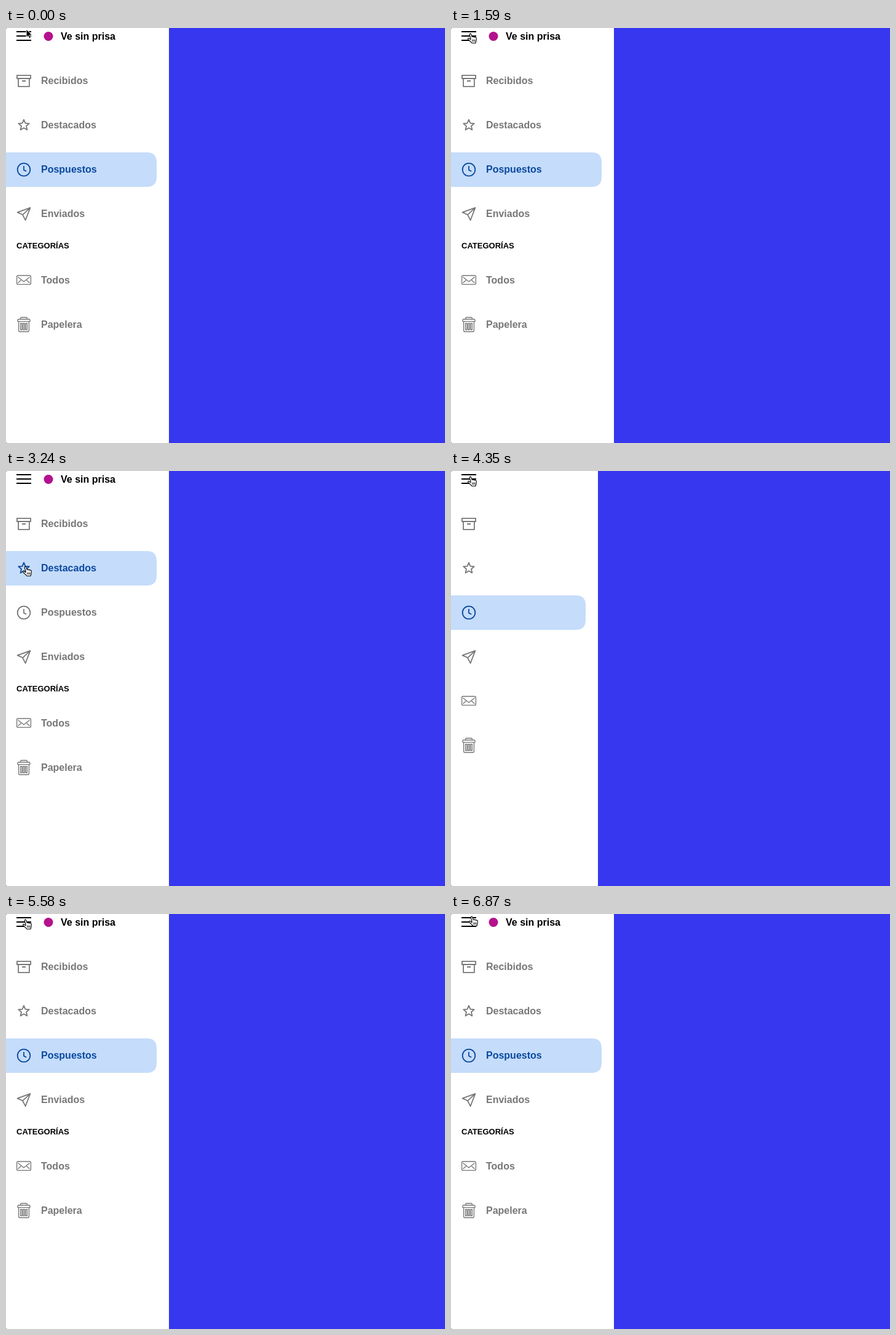
An HTML page for the animation above (6900 ms loop, 714 px wide and 674 px high).

```html
<!DOCTYPE html>
<html lang="es">
<head>
<meta charset="utf-8">
<title>Menú lateral</title>
<style>
  html, body { margin: 0; width: 100%; height: 100%; overflow: hidden; background: #444; }
  svg { display: block; width: 714px; height: 674px; border-radius: 2px; }
  text { font: bold 16px "Liberation Sans", Arial, sans-serif; }
  .item { color: #777; }
  .item.on { color: #0b4a9f; }
  .item text { fill: currentColor; }
  .icon { fill: none; stroke: currentColor; stroke-width: 1.8; stroke-linejoin: round; }
  .thin { stroke-width: 1.35; }
  .small { font-size: 13px; }
</style>
</head>
<body>
<svg viewBox="0 0 714 674">
  <rect width="714" height="674" fill="#3737ef"/>
  <rect id="panel" height="674" fill="#fff"/>
  <path d="M17 6H41M17 13H41M17 20H41" stroke="#000" stroke-width="2.1"/>
  <path id="mark" fill="#c5dcfb"/>
  <g id="items"></g>
  <g id="labels">
    <circle cx="69" cy="13.5" r="7.5" fill="#b3128c"/>
    <text x="89" y="19">Ve sin prisa</text>
    <text class="small" x="17" y="358">CATEGORÍAS</text>
  </g>
  <g id="arrow">
    <path d="M0 0V13.2L3 10.5 5.1 15.2 7.4 14.2 5.4 9.6H9.6Z" fill="#000" stroke="#fff" stroke-width="1"/>
  </g>
  <g id="hand">
    <g transform="translate(-5 -1)" stroke="#000" stroke-linejoin="round" stroke-linecap="round">
      <path fill="#fff" stroke-width="1.1" d="M6.2 9.5 4.2 3C3.6 1.2 6 .4 6.7 2.1L8.3 6.6C8.6 5.4 10.6 5.6 10.8 6.9 11.3 5.9 13 6.2 13.1 7.4 14 6.8 15.3 7.3 15.3 8.8 15.5 12 15 13.5 14 16.5H8C6.5 14.5 4.2 13 2.2 10.8.6 9 2.2 7.9 3.6 8.8L6 11"/>
      <path stroke-width=".9" d="M8.8 11V14M10.8 11V14M12.8 11V14"/>
    </g>
  </g>
</svg>
<script>
const LOOP = 6900, STEP = 30, SLIDE = 350;
const OPEN = 265, CLOSED = 81;
const $ = id => document.getElementById(id);

const star = Array.from({ length: 10 }, (_, i) => {
  const r = i % 2 ? 4.2 : 9.2, a = i * Math.PI / 5;
  return (r * Math.sin(a)).toFixed(2) + ' ' + (-r * Math.cos(a)).toFixed(2);
}).join('L');

// Icon paths are drawn around the centre of each row.
const items = [
  ['Recibidos', 86, 'M-11.1-9.1H11.1V-4H-11.1ZM-8.9-4V9.1H8.9V-4M-3 0H3'],
  ['Destacados', 158, 'M' + star + 'Z'],
  ['Pospuestos', 230, 'M-10.3 0A10.3 10.3 0 1 1 10.3 0A10.3 10.3 0 1 1-10.3 0M0-6V.6L4.2 2.8'],
  ['Enviados', 302, 'M10.4-10.1-10.4-2.6-1.9 1.3 2.6 10.2ZL-1.9 1.3'],
  ['Todos', 409, 'M-9.4-7H9.4Q11.4-7 11.4-5V5.4Q11.4 7.4 9.4 7.4H-9.4Q-11.4 7.4-11.4 5.4V-5Q-11.4-7-9.4-7ZM-9.5-4.5 0 3 9.5-4.5M-9.5 5-4.5.6M9.5 5 4.5.6', 'thin'],
  ['Papelera', 482, 'M-5.4-9V-10.5Q-5.4-12-4-12H4Q5.4-12 5.4-10.5V-9M-8.6-9H8.6Q10-9 10-7.6V-5.4H-10V-7.6Q-10-9-8.6-9ZM-8.4-5.4V9Q-8.4 11.2-6.2 11.2H6.2Q8.4 11.2 8.4 9V-5.4M-5.4-2.4H-3V8H-5.4ZM-1.2-2.4H1.2V8H-1.2ZM3-2.4H5.4V8H3Z', 'thin']
];
$('items').innerHTML = items.map(([name, y, d, extra = '']) =>
  `<g class="item"><path class="icon ${extra}" transform="translate(29 ${y})" d="${d}"/>` +
  `<text x="57" y="${y < 400 ? y + 5 : y === 409 ? 415 : 487}">${name}</text></g>`).join('');
const rows = [...$('items').children];

// [start, opens]
const slides = [[490, 0], [1045, 1], [1740, 0], [2344, 1], [4305, 0], [5004, 1], [5588, 0], [6220, 1]];
// [time, selected row]
const picks = [[0, 2], [3060, 1], [3540, 0], [3960, 2]];
// [time, x, y] of the pointer tip
const moves = [[0, 33, 2], [90, 33, 2], [210, 31, 9], [2850, 31, 9], [3000, 31, 155],
  [3360, 31, 155], [3480, 31, 84], [3690, 31, 84], [3930, 31, 228], [3960, 31, 228],
  [4260, 31, 9], [6570, 31, 9], [6870, 33, 4], [LOOP, 33, 4]];

const last = (list, t) => list.filter(k => k[0] <= t).pop();
const show = (el, on) => { el.style.display = on ? '' : 'none'; };

// cubic-bezier(.25, .1, .25, 1)
function ease(x) {
  let lo = 0, hi = 1;
  for (let i = 0; i < 24; i++) {
    const s = (lo + hi) / 2;
    if (.75 * s * (1 - s) + s ** 3 < x) lo = s; else hi = s;
  }
  return .3 * (1 - lo) ** 2 * lo + 3 * (1 - lo) * lo * lo + lo ** 3;
}

function pointer(t) {
  const i = moves.findIndex(k => k[0] > t);
  const [a, b] = [moves[i - 1], moves[i]];
  const p = (t - a[0]) / (b[0] - a[0]);
  const q = p * p * (3 - 2 * p);
  return [1, 2].map(n => Math.round(a[n] + (b[n] - a[n]) * q));
}

function draw(t) {
  const [start, opens] = last(slides, t) || [-SLIDE, 1];
  const p = Math.min(1, (t - start) / SLIDE);
  const from = opens ? CLOSED : OPEN, to = opens ? OPEN : CLOSED;
  const width = Math.round(from + (to - from) * ease(p));
  const labelled = opens && p === 1;
  const picked = last(picks, t)[1];

  $('panel').setAttribute('width', width);
  $('mark').setAttribute('d', `M0 ${58 + picked * 72}h${width - 36}q16 0 16 16v24q0 16-16 16H0Z`);
  show($('labels'), labelled);
  rows.forEach((row, i) => {
    row.classList.toggle('on', i === picked);
    row.setAttribute('transform', `translate(0 ${i > 3 && !labelled ? -36 : 0})`);
    show(row.lastChild, labelled);
  });

  const spot = `translate(${pointer(t)})`;
  const arrow = t < 150;
  show($('arrow'), arrow);
  show($('hand'), !arrow);
  $('arrow').setAttribute('transform', spot);
  $('hand').setAttribute('transform', spot);
}

const begin = performance.now();
function tick() {
  const t = (performance.now() - begin + 1) % LOOP;
  draw(Math.floor(t / STEP) * STEP);
  requestAnimationFrame(tick);
}
tick();
</script>
</body>
</html>
```
